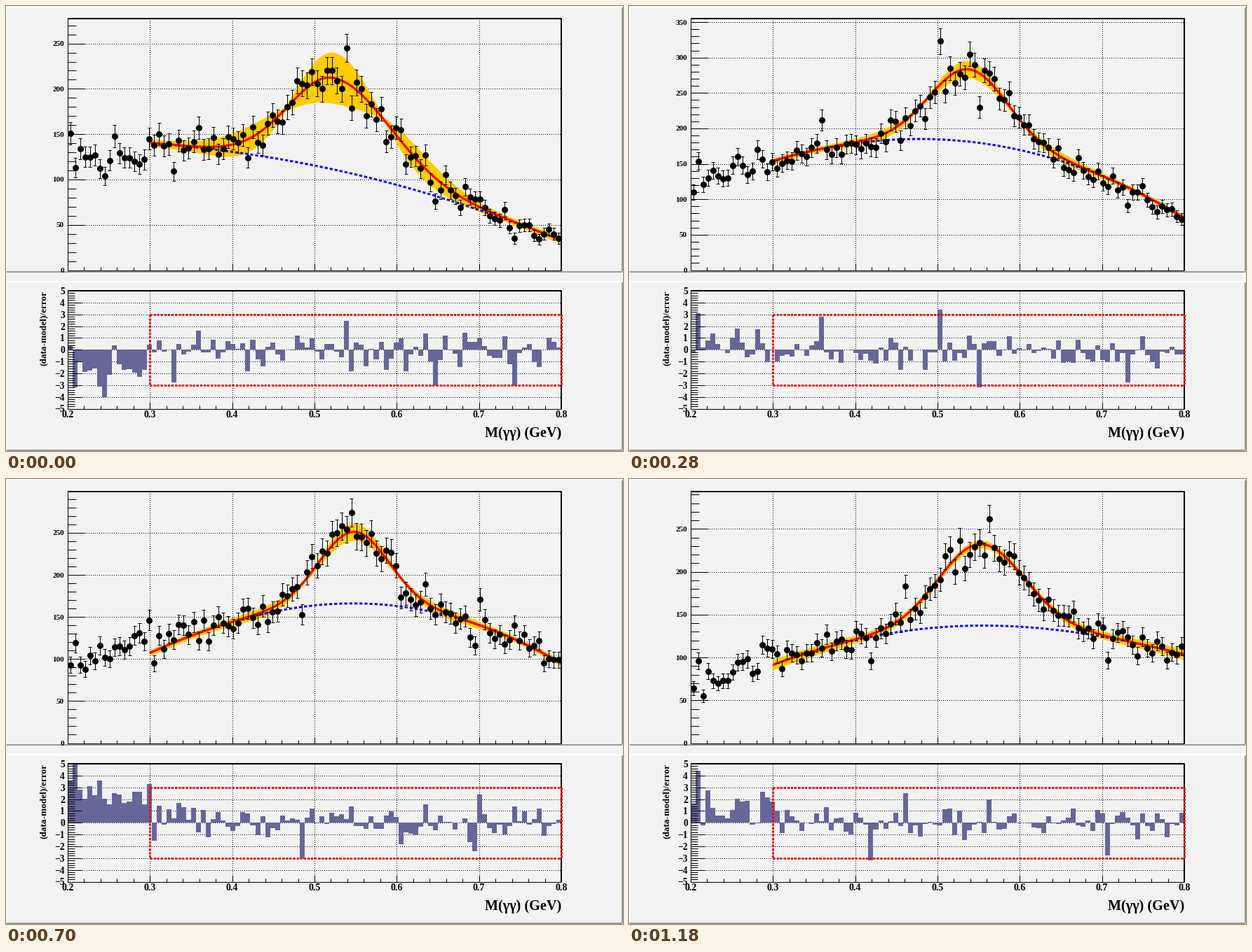
Recreate the animation shown at these times as a matplotlib script. Size 880 px wide and 636 px high, loop 1300 ms.

```python
import numpy as np
import matplotlib.pyplot as plt
from matplotlib.animation import FuncAnimation

W, H, DPI = 880, 636, 100
PX = 72 / DPI
L, R = 88, 792
TOP, BASE = 18, 377.5
RES_TOP, RES_BASE = 407, 575.5
BINS, LEFT_BINS = 100, 16
KNOTS = np.linspace(0.2, 0.8, 5)

fig = plt.figure(figsize=(W / DPI, H / DPI), dpi=DPI, facecolor="#f2f2f2")
ax = fig.add_axes([0, 0, 1, 1])
ax.set_xlim(0, W)
ax.set_ylim(H, 0)
ax.axis("off")


def px(mass):
    return L + (np.asarray(mass) - 0.2) / 0.6 * (R - L)


def res_y(pull):
    return (RES_TOP + RES_BASE) / 2 - np.asarray(pull) * (RES_BASE - RES_TOP) / 10


def label(x, y, s, size, ha="right", va="center_baseline", **kw):
    return ax.text(x, y, s, fontsize=size * PX, ha=ha, va=va, weight="bold",
                   family="Liberation Serif", zorder=9, **kw)


def line(xs, ys, color="k", width=1, z=1, **kw):
    return ax.plot(xs, ys, color=color, lw=width * PX, zorder=z,
                   solid_capstyle="butt", dash_capstyle="butt", **kw)[0]


def dotted(xs, ys):
    # half a pixel of offset puts each dot on a whole pixel
    return line(xs, ys, ls=(0.5, (1, 2)))


def ticks(ys, length):
    return ax.hlines(ys, L, L + length, color="k", lw=PX, zorder=8)


def draw_pad(top, bottom):
    line([0, W], [top + 1] * 2, "white", 2)
    line([1, 1], [top, bottom], "white", 2)
    line([1, W - 1], [bottom + 1] * 2, "#999999", 2)
    line([W - 1] * 2, [top + 2, bottom], "#999999", 2)


def draw_frame(top, bottom):
    line([L, R, R], [top, top, bottom], width=2, z=8)
    line([L, L, R], [top, bottom, bottom], z=8)
    for k in range(31):
        x, size = px(0.2 + 0.02 * k), 5 if k % 5 else 10
        line([x, x], [bottom, bottom - size], z=8)
    for k in range(3, 8):
        dotted([px(k / 10)] * 2, [bottom, top])


def draw_limits(x0, x1, y0, y1):
    for xs, ys in (([x0, x1], [y0, y0]), ([x0, x1], [y1, y1]),
                   ([x0, x0], [y0, y1]), ([x1, x1], [y0, y1])):
        line(xs, ys, "red", 3, 10, ls=(0, (1, 0.7)))


def draw_static():
    draw_pad(0, 379)
    draw_pad(393, 634)
    draw_frame(TOP, BASE)
    draw_frame(RES_TOP, RES_BASE)
    draw_limits(px(0.3), R, res_y(3), res_y(-3))
    ticks(res_y(np.arange(-25, 26) / 5), 10)
    ticks(res_y(np.arange(-5, 6)), 20)
    for k in range(-5, 6):
        if abs(k) < 5:
            dotted([L, R], [res_y(k)] * 2)
        label(84, res_y(k), str(k).replace("-", "\u2212"), 13.5)
    for k in range(2, 9):
        label(px(k / 10), 583.5, f"0.{k}", 14, ha="center")
    label(R, 616, "M(γγ) (GeV)", 20.3, va="baseline")
    label(53.5, 407, "(data-model)/error", 13.3, ha="center", va="top", rotation=90)


def make_fit(knot_values, amp, mean, left, right):
    """Smooth background through the knots plus a two-sided Gaussian peak."""
    poly = np.polyfit(KNOTS - 0.5, knot_values, 4)

    def bkg(m):
        return np.polyval(poly, m - 0.5)

    def total(m):
        width = np.where(m < mean, left, right)
        return bkg(m) + amp * np.exp(-0.5 * ((m - mean) / width) ** 2)

    return bkg, total


def band_half(m, mean, base, swell):
    """Fit error: wider at the ends, swelling at the peak and beside it."""
    u2 = ((m - mean) / 0.06) ** 2
    return base * (0.7 + 9 * (m - 0.55) ** 2) + swell * np.abs(1 - u2) * np.exp(-u2 / 2)


def make_pulls(seed, left_pull, strong):
    pulls = np.clip(np.random.default_rng(seed).normal(0, 0.85, BINS), -1.8, 1.8)
    pulls[:LEFT_BINS] += left_pull
    pulls[list(strong)] = list(strong.values())
    return pulls


def draw_scene(seed, top, knots, peak, band, left_pull, strong):
    """Return the artists of one fit; strong maps bin number to pull."""
    bkg, total = make_fit(knots, *peak)
    pulls = make_pulls(seed, left_pull, strong)

    def py(v):
        return BASE - np.asarray(v) * (BASE - TOP) / top

    mass = 0.2 + 0.6 * (np.arange(BINS) + 0.5) / BINS
    model = total(mass)
    count = np.round(model + pulls * np.sqrt(model) + pulls ** 2 / 2)
    err = np.sqrt(count)
    x, lo, hi = px(mass), py(count - err), py(count + err)
    ends, caps = np.r_[lo, hi], np.r_[x, x]

    m = np.linspace(0.3, 0.8, 250)
    red, half = total(m), band_half(m, peak[1], *band)
    art = [
        ax.fill_between(px(m), py(red - half), py(red + half),
                        color="#ffcc00", lw=0, zorder=2),
        line(px(m), py(bkg(m)), "blue", 3, 3, ls=(0, (1.4, 1))),
        line(px(m), py(red), "red", 3.2, 4),
        ax.vlines(x, hi, lo, color="k", lw=PX, zorder=5),
        ax.hlines(ends, caps - 2.5, caps + 2.5, color="k", lw=PX, zorder=5),
        ax.plot(x, py(count), "ko", ms=9 * PX, mew=0, zorder=6)[0],
        ax.stairs(res_y(np.clip(pulls, -5, 5)), np.linspace(L, R, BINS + 1),
                  baseline=res_y(0), fill=True, color="#666699", lw=0,
                  zorder=3, antialiased=False),
        ticks(py(np.arange(0, top, 10)), 12),
        ticks(py(np.arange(0, top, 50)), 25),
    ]
    for v in range(0, int(top), 50):
        art.append(label(83, py(v), str(v), 11.3))
        if v:
            art.append(dotted([L, R], [py(v)] * 2))
    return art


draw_static()
scenes = [
    draw_scene(3, 277.5, (147, 136, 115.4, 81, 33), (101, 0.524, 0.055, 0.068),
               (3, 26), -1.4, {7: -4, 21: -2.8, 56: 2.45, 74: -3, 90: -3.1}),
    draw_scene(5, 355, (111, 169, 184.6, 154, 73.5), (102, 0.538, 0.047, 0.047),
               (3, 10), 0.4, {1: 3.1, 26: 2.8, 50: 3.4, 58: -3.2, 88: -2.8}),
    draw_scene(8, 387.8, (150, 190, 200, 175, 117), (132, 0.545, 0.048, 0.052),
               (5, 1), -1.1, {8: -3.5, 27: 2.4, 31: -3.2, 68: 2.3, 96: -3.4}),
    draw_scene(13, 299, (58, 127.5, 163.7, 154.5, 95), (85, 0.548, 0.042, 0.042),
               (3, 8), 2, {1: 5.3, 16: 3.3, 47: -3, 82: -2.4, 83: 2.4}),
    draw_scene(21, 293.5, (50, 107.5, 135, 131.5, 103.5), (95, 0.552, 0.05, 0.053),
               (5, 1), 1.3, {1: 4.4, 36: -3.2, 43: 2.5, 60: 2, 84: -2.8}),
]


def show(i):
    # the first scene stays one step, the others three
    current = (i + 2) // 3
    for k, scene in enumerate(scenes):
        for artist in scene:
            artist.set_visible(k == current)
    return scenes[current]


anim = FuncAnimation(fig, show, frames=13, init_func=lambda: show(0),
                     interval=100, repeat=True, repeat_delay=0, blit=False)
plt.show()
```
